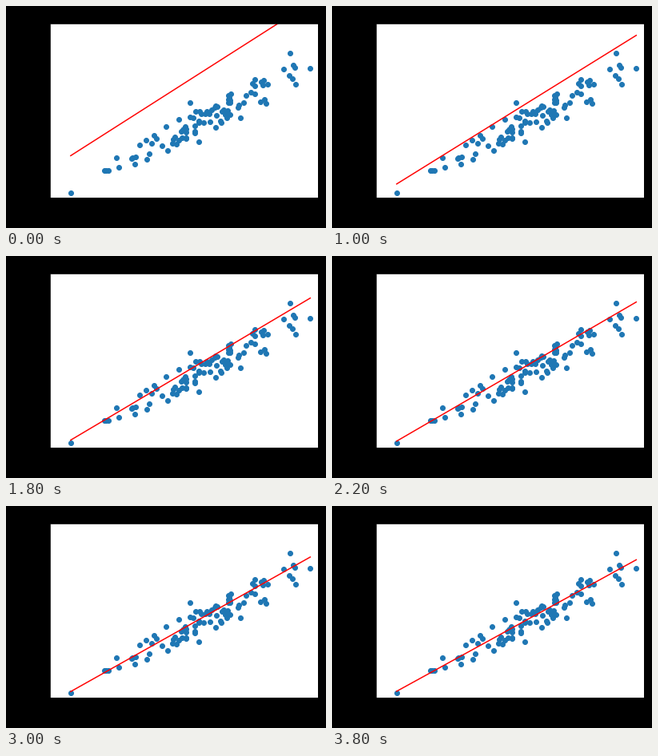
Recreate the animation shown at these times as a matplotlib script. Size 400 px wide and 278 px high, loop 4000 ms.

```python
import numpy as np
import matplotlib.pyplot as plt
from matplotlib.animation import FuncAnimation

W, H, DPI = 400, 278, 72
FRAMES, INTERVAL = 20, 200
RATE = 0.18
START = 55.09, 81.4  # slope and intercept of the first line

# Noisy linear data
rng = np.random.RandomState(42)
x = rng.standard_normal(100)
y = 100 * rng.uniform() * x + rng.normal(scale=15, size=100)


def descend(slope, intercept, steps):
    """Fit a line by gradient descent, returning every (slope, intercept)."""
    path = [(slope, intercept)]
    for _ in range(steps):
        err = y - slope * x - intercept
        slope += RATE * np.mean(err * x)
        intercept += RATE * np.mean(err)
        path.append((slope, intercept))
    return path


path = descend(*START, FRAMES - 1)

# Axes box in pixels, measured from the top left
left, top, width, height = 55.4, 22.1, 334.8, 217.44

fig = plt.figure(figsize=(W / DPI, H / DPI), dpi=DPI, facecolor="black")
ax = fig.add_axes([left / W, 1 - (top + height) / H, width / W, height / H])
ax.set(xlim=(-3, 2), ylim=(-130, 150), xticks=[], yticks=[])
ax.scatter(x, y, color="tab:blue")

ends = np.array([x.min(), x.max()])
line, = ax.plot(ends, ends, color="red", lw=1.5)


def update(i):
    slope, intercept = path[i]
    line.set_ydata(slope * ends + intercept)
    return line,


anim = FuncAnimation(fig, update, frames=FRAMES, interval=INTERVAL,
                     repeat=True, repeat_delay=0)
plt.show()
```
